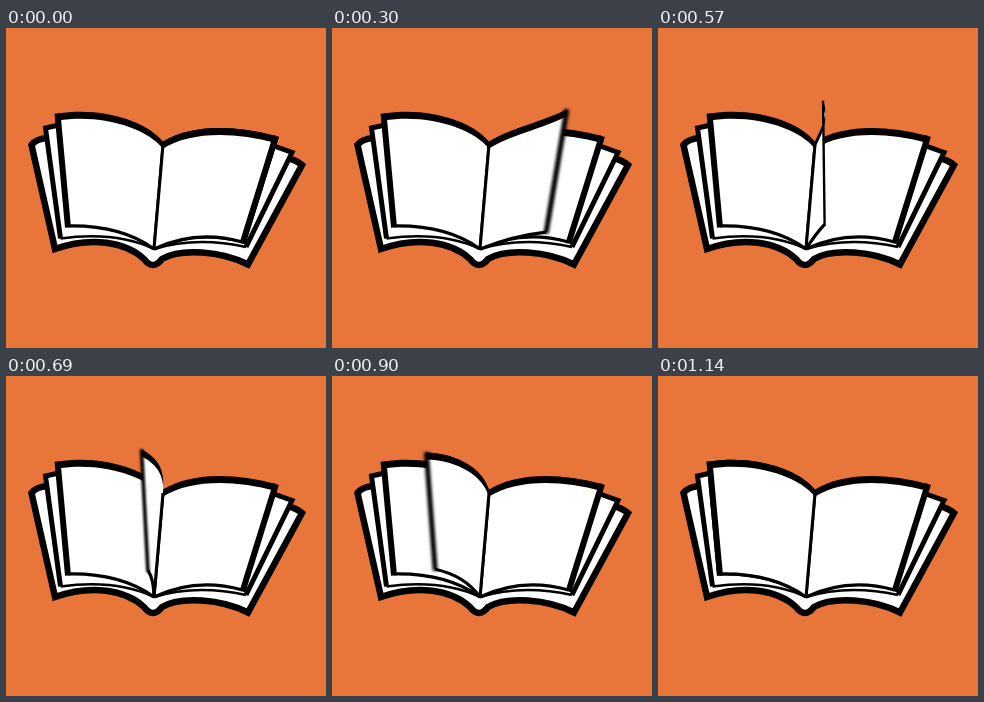
Write an HTML page with a canvas that moves like this. It is 320 px wide and 320 px high and loops after 1170 ms.

```html
<!DOCTYPE html>
<html lang="en">
<head>
<meta charset="utf-8">
<title>Page turn</title>
<style>
  html, body { margin: 0; width: 100%; height: 100%; overflow: hidden; background: #e8763a; }
  canvas { display: block; width: 100vmin; height: 100vmin; }
</style>
</head>
<body>
<canvas width="320" height="320"></canvas>
<script>
const ctx = document.querySelector('canvas').getContext('2d');
const LOOP = 1170, STEP = 30, TURN = LOOP - STEP;
const ORANGE = '#e8763a';
const SPINE = { x: 157, y: 117 }, FOOT = '148,221';
const RIM = 3.5;

// Swings a coordinate from its right to its left rest, lifted on the way
function swing(angle, right, left, lift = 0, skew = 0) {
  const c = Math.cos(angle), s = Math.sin(angle);
  return (right + left) / 2 + (right - left) / 2 * c + s * (lift + skew * c);
}

// The turn is steady at first and lags before the page lands
function angleAt(time) {
  const u = time / TURN;
  return Math.PI * (u - 1.6 * u ** 6 * (1 - u));
}

function stroke(path, width) {
  ctx.lineWidth = width;
  ctx.stroke(path);
}

function drawSpine() {
  stroke(new Path2D(`M${SPINE.x},${SPINE.y}L${FOOT}`), 3);
}

function drawPage(angle) {
  const at = (...range) => swing(angle, ...range);
  const near = { x: at(182, 140, 3), y: at(101, 96, 2, 5) };
  const far = { x: at(225, 95, 8), y: at(99, 82, -2, 5) };
  const tip = { x: at(270, 51.5), y: at(111.5, 89, 24, 11) - at(0, 0, 48, 22) };
  const foot = {
    x: at(236.5, 62, 14 * Math.sin(angle) ** 2),
    y: at(214, 198, -10)
  };
  const bend = `Q${at(190, 115, 4)},${at(201, 197, 6, 6)} ${FOOT}`;
  const point = (p, dy = 0) => `${p.x},${p.y + dy} `;

  ctx.fillStyle = '#fff';
  ctx.fill(new Path2D(
    `M${point(SPINE)}C${point(near)}${point(far)}${point(tip)}L${point(foot)}${bend}Z`));

  // The top border keeps its height while the page is foreshortened
  ctx.fillStyle = '#000';
  ctx.fill(new Path2D(
    `M${point(SPINE, -RIM)}C${point(near, -RIM)}${point(far, -RIM)}${point(tip, -RIM)}` +
    `L${point(tip, RIM)}C${point(far, RIM)}${point(near, RIM)}${point(SPINE, RIM)}Z`));
  stroke(new Path2D(`M${point(foot)}${bend}`), 3.2);

  // The outer edge thins when seen end-on and blurs while sweeping
  const blur = 1.8 * Math.abs(Math.sin(2 * angle));
  ctx.filter = blur > .05 ? `blur(${blur}px)` : 'none';
  stroke(new Path2D(`M${point(tip, -RIM)}L${point(foot, 1.5)}`),
    1.5 + 4.5 * Math.sqrt(Math.abs(Math.cos(angle))));
  ctx.filter = 'none';
}

const cover = new Path2D(
  'M147,120L41,110Q30,111 25.5,117L49,221C85,208 120,214 138,231Q147,243 156,231' +
  'C175,220 215,223 242,236.5L296,137Q290,132 281,130L157,120Z');
const sheets = [
  ['M53,97L39.5,100L54.5,210.5', `M54.5,210.5Q110,203 ${FOOT}`],
  ['M268,118L286,124.5L240,219', `M240,219Q190,208 ${FOOT}`]
].map(pair => pair.map(d => new Path2D(d)));

function drawBook() {
  ctx.fillStyle = ORANGE;
  ctx.fillRect(0, 0, 320, 320);
  ctx.fillStyle = '#fff';
  ctx.fill(cover);
  stroke(cover, 6.5);
  for (const [side, foot] of sheets) {
    ctx.fill(side);
    stroke(side, 5);
    stroke(foot, 2.5);
  }
  drawPage(0);
  drawPage(Math.PI);
  drawSpine();
}

function frame() {
  const time = Math.floor(performance.now() % LOOP / STEP) * STEP;
  drawBook();
  drawPage(angleAt(time));
  drawSpine();
  requestAnimationFrame(frame);
}
frame();
</script>
</body>
</html>
```
